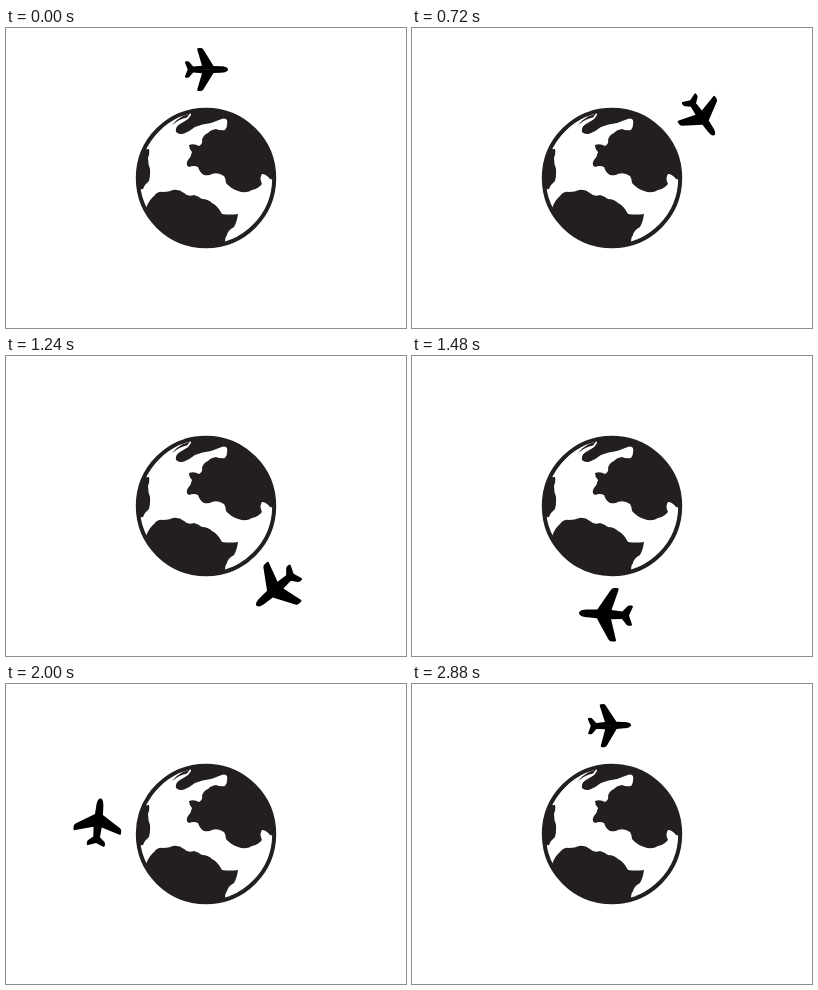
Animation of 400 by 300 pixels, one loop 2.92 s. Source, as an HTML page:

```html
<!DOCTYPE html>
<html lang="en">
<head>
<meta charset="utf-8">
<title>Plane around the globe</title>
<style>
  html, body { margin: 0; width: 100%; height: 100%; overflow: hidden; background: #fff; }
  svg { display: block; width: 400px; height: 300px; }
</style>
</head>
<body>
<svg viewBox="0 0 400 300">
  <defs>
    <clipPath id="disc"><circle cx="200" cy="150" r="69"/></clipPath>
    <path id="half" d="M22 0C22 -2 19 -3 15 -3.2L7.500 -3.6L-2.800 -20.200Q-3.800 -21.600 -5.500 -21.600L-7.500 -21.600Q-9.400 -21.600 -8.700 -19.800L-4 -3.700L-12.800 -3L-16.500 -7.300Q-17.300 -8.200 -18.500 -8.200L-20 -8.200Q-21.500 -8 -21 -6.800L-18.300 0V.3H22Z"/>
  </defs>

  <g fill="#231f20">
    <g clip-path="url(#disc)">
      <!-- north -->
      <path d="M184 78L185 87Q183 91 179 93L174 96Q169 99 170 104Q173 107 178 105.500Q184 103 189 99Q196 96 205 95L213 92Q219 89 221 92Q222 98 219 102Q214 103 210 101Q204 102 202 105Q197 107 196 112Q197 116 193 118Q188 115 183 117Q183 121 186 124Q185 129 182 132Q179 137 183 139Q188 137 192 139Q194 145 198 147Q203 148 206 146Q212 144 218 148Q220 151 220 155Q224 160 232 163Q240 166 246 162Q252 161 256 156Q253 150 256 146Q260 146 264 151L275 153V75Z"/>
      <path d="M166 97Q171 91 177 88L184 85.500L181 89.500Q173 91 169 95Z"/>
      <!-- west -->
      <path d="M130 122L143 121Q144 125 142 130Q142 136 144 141Q144.500 147 143 153Q139 156 137 161L128 162Z"/>
      <!-- south -->
      <path d="M132 184L140 180Q143 172 148 168Q152 163 157 164Q163 164 167 162Q173 161 178 165Q182 169 188 167Q192 168 196 171Q202 171 206 175Q212 178 216 186Q224 187 232 186Q231 194 228 199Q222 202 221 207Q217 212 221 222H140Z"/>
    </g>
    <circle cx="200" cy="150" r="68.200" fill="none" stroke="#231f20" stroke-width="4"/>
  </g>

  <g id="plane">
    <use href="#half"/>
    <use href="#half" transform="scale(1 -1)"/>
  </g>
</svg>
<script>
  const LOOP = 2920, STEP = 40, RADIUS = 108.5;
  const plane = document.getElementById('plane');

  // One eased lap with a slight, growing sway.
  function angleAt(t) {
    const x = t / LOOP;
    const sway = 1.4 * x * Math.cos(4 * Math.PI * x);
    return 360 * x * x * (3 - 2 * x) - sway;
  }

  function draw(now) {
    const t = Math.floor((now % LOOP) / STEP) * STEP;
    const angle = angleAt(t);
    const size = 1.12 - 0.12 * Math.cos(angle * Math.PI / 180);
    plane.setAttribute('transform',
      `translate(200 150) rotate(${angle}) translate(0 ${-RADIUS}) scale(${size})`);
  }

  const start = performance.now();
  function tick() {
    draw(performance.now() - start);
    requestAnimationFrame(tick);
  }
  tick();
</script>
</body>
</html>
```
